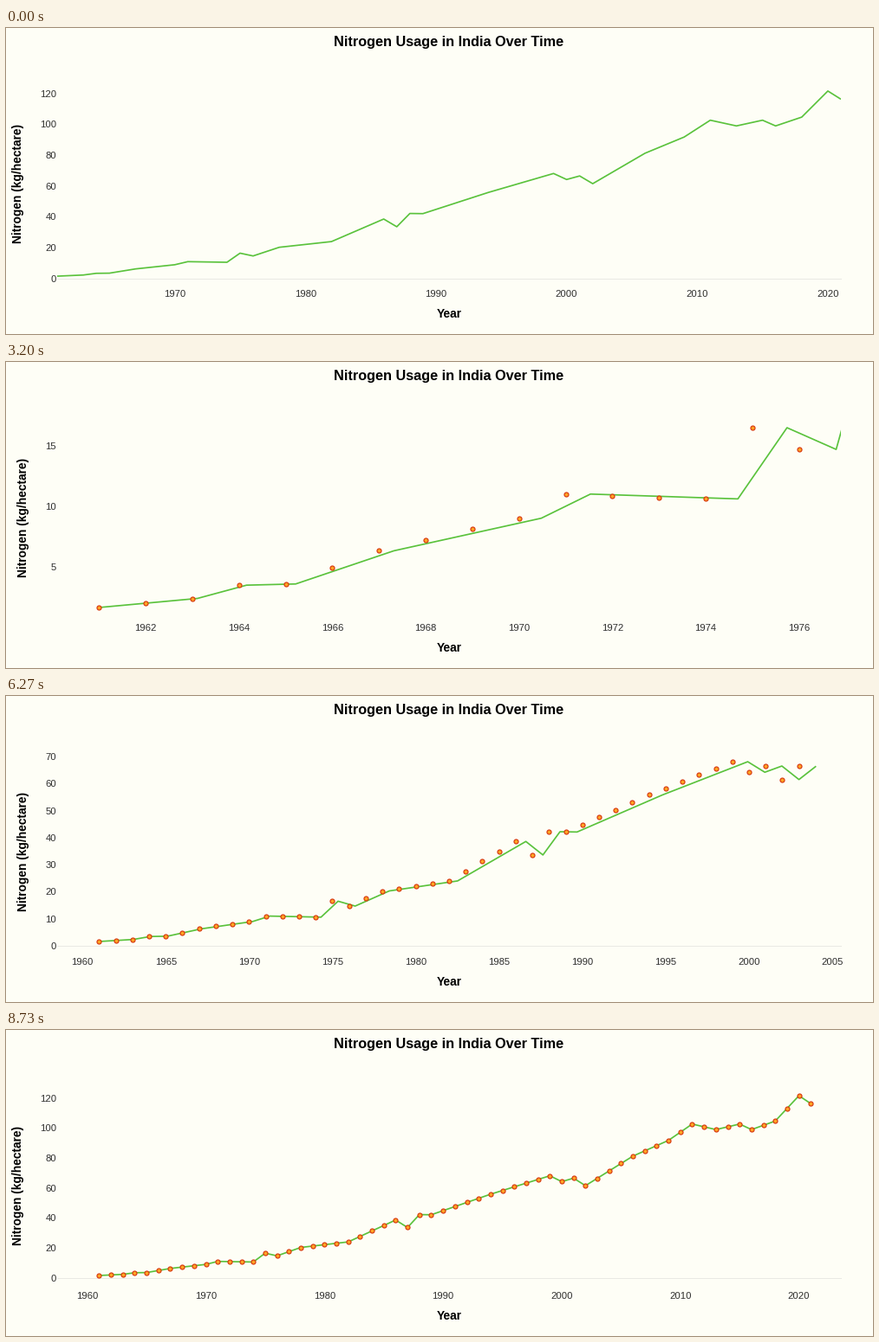
A matplotlib script that plays this animation: 1000x354 px, repeating every 9 s.

```python
import math

import matplotlib.pyplot as plt
import numpy as np
from matplotlib.animation import FuncAnimation
from matplotlib.patches import Rectangle

W, H = 1000, 354
LEFT, RIGHT, TOP, BOTTOM = 59, 963, 61, 299
PX = 0.72  # points per pixel at 100 dpi

LOOP, TICK = 9000, 50
POSES = 135  # the picture changes 15 times a second
START, STEP, GLIDE = 1320, 115, 100  # ms: first year, per year, line easing
FIRST, LAST = 1961, 2021

# Turning points of the curve; the years between lie on straight lines.
TURNS = {
    1961: 1.6, 1963: 2.35, 1964: 3.45, 1965: 3.55, 1967: 6.3, 1970: 9,
    1971: 11, 1974: 10.6, 1975: 16.5, 1976: 14.7, 1978: 20.3, 1982: 24,
    1986: 38.6, 1987: 33.6, 1988: 42.2, 1989: 42.1, 1994: 55.8, 1999: 68.1,
    2000: 64.2, 2001: 66.5, 2002: 61.5, 2006: 81.2, 2009: 91.7, 2011: 102.6,
    2013: 98.9, 2015: 102.6, 2016: 98.9, 2018: 104.6, 2020: 121.5,
    2021: 116.2}
YEARS = np.arange(FIRST, LAST + 1)
USAGE = np.interp(YEARS, list(TURNS), list(TURNS.values()))


def padded(lo, hi, length, pad):
    """Widen a range so that both ends sit pad pixels inside the axis."""
    extra = (hi - lo) * pad / (length - 2 * pad)
    return lo - extra, hi + extra


class Scale:
    """Automatic axis ranges for data up to a year; before FIRST, all data."""

    def __init__(self, last):
        width, height = RIGHT - LEFT, BOTTOM - TOP
        if last < FIRST:
            self.x = FIRST, LAST
            self.y = padded(USAGE.min(), USAGE.max(), height, 11.9)
        elif last == FIRST:
            self.x = FIRST - 1, FIRST + 1
            self.y = USAGE[0] - 1, USAGE[0] + 1
        else:
            seen = USAGE[:last - FIRST + 1]
            self.x = padded(FIRST, last, width, 48.4)
            self.y = padded(seen.min(), seen.max(), height, 15)

    def px(self, year):
        lo, hi = self.x
        return LEFT + (year - lo) / (hi - lo) * (RIGHT - LEFT)

    def py(self, value):
        lo, hi = self.y
        return BOTTOM - (value - lo) / (hi - lo) * (BOTTOM - TOP)

    def points(self, count):
        return np.column_stack([self.px(YEARS[:count]), self.py(USAGE[:count])])


def ticks(limits, most):
    lo, hi = limits
    rough = (hi - lo) / most
    base = 10 ** math.floor(math.log10(rough))
    step = base * next(m for m in (2, 5, 10) if rough / base <= m + 1e-6)
    first = math.ceil(lo / step - 1e-6)
    final = math.floor(hi / step + 1e-6)
    return [round(n * step, 6) for n in range(first, final + 1)]


def label_width(text):
    return sum(3.1 if c == "." else 6.23 for c in text)


def ease(u):
    u = min(max(u, 0), 1)
    return 4 * u ** 3 if u < 0.5 else 1 - 4 * (1 - u) ** 3


fig = plt.figure(figsize=(W / 100, H / 100), dpi=100, facecolor="#fefef6")
ax = fig.add_axes([0, 0, 1, 1])
ax.set_xlim(0, W)
ax.set_ylim(H, 0)
ax.axis("off")
plot_area = Rectangle((LEFT, TOP), RIGHT - LEFT, BOTTOM - TOP,
                      transform=ax.transData)


def label(x, y, text="", size=11.2, color="#2e2e2e", **style):
    style = {"ha": "center", "va": "baseline", **style}
    return ax.text(x, y, text, fontsize=size * PX, color=color,
                   family="Liberation Sans", **style)


def dots():
    mark, = ax.plot([], [], "o", ms=5 * PX, mew=1.2 * PX,
                    mfc="#ffa524", mec="#d83a10", zorder=3)
    mark.set_clip_path(plot_area)
    return mark


label(511, 20.5, "Nitrogen Usage in India Over Time", 16.2, "black",
      weight="bold")
label(511, 335, "Year", 13.7, "black", weight="bold")
y_title = label(18, 180, "Nitrogen (kg/hectare)", 13.7, "black",
                weight="bold", rotation=90, rotation_mode="anchor")
x_labels = [label(0, 311) for _ in range(14)]
y_labels = [label(58, 0, ha="right") for _ in range(14)]

zero, = ax.plot([], [], color="#e9e9e4", lw=PX, zorder=1)
line, = ax.plot([], [], color="#5ac23c", lw=1.7 * PX, zorder=2,
                solid_joinstyle="round", solid_capstyle="butt")
line.set_clip_path(plot_area)
shown, fading = dots(), dots()


def draw_axes(scale):
    xs, ys = ticks(scale.x, 10), ticks(scale.y, 8)
    for item in x_labels + y_labels:
        item.set_text("")
    for item, year in zip(x_labels, xs):
        item.set_text(f"{year:.6g}")
        item.set_x(scale.px(year))
    for item, value in zip(y_labels, ys):
        item.set_text(f"{value:.6g}")
        item.set_y(scale.py(value) + 4)
    y_title.set_x(36.7 - max(label_width(f"{v:.6g}") for v in ys))
    zero.set_data([LEFT, RIGHT], [scale.py(0)] * 2)
    zero.set_visible(scale.y[0] <= 0 <= scale.y[1])


def put(artist, points):
    artist.set_data(points[:, 0], points[:, 1])


def update(i):
    pose = int(i * TICK * POSES / LOOP + 0.5)
    t = pose * LOOP / POSES
    if t < START:
        scale = Scale(0)
        draw_axes(scale)
        put(line, scale.points(len(YEARS)))
        shown.set_data([], [])
        fading.set_data([], [])
        return

    old = min(int((t - START) // STEP), LAST - FIRST)
    year = FIRST + old
    u = (t - START - old * STEP) / GLIDE
    p = ease(u)

    # Axes and dots jump at once; the line glides over from the last scale.
    scale = Scale(year - 1)
    draw_axes(scale)
    goal = scale.points(old + 1)
    path = Scale(year - 2).points(old) * (1 - p) + goal[:old] * p
    put(line, np.vstack([path, goal[old:]]) if u > 0.05 else path)
    put(shown, goal[:old])
    put(fading, goal[old:])
    fading.set_alpha(p)


anim = FuncAnimation(fig, update, frames=LOOP // TICK, interval=TICK,
                     init_func=lambda: update(0), repeat=True, repeat_delay=0,
                     blit=False, cache_frame_data=False)
plt.show()
```
